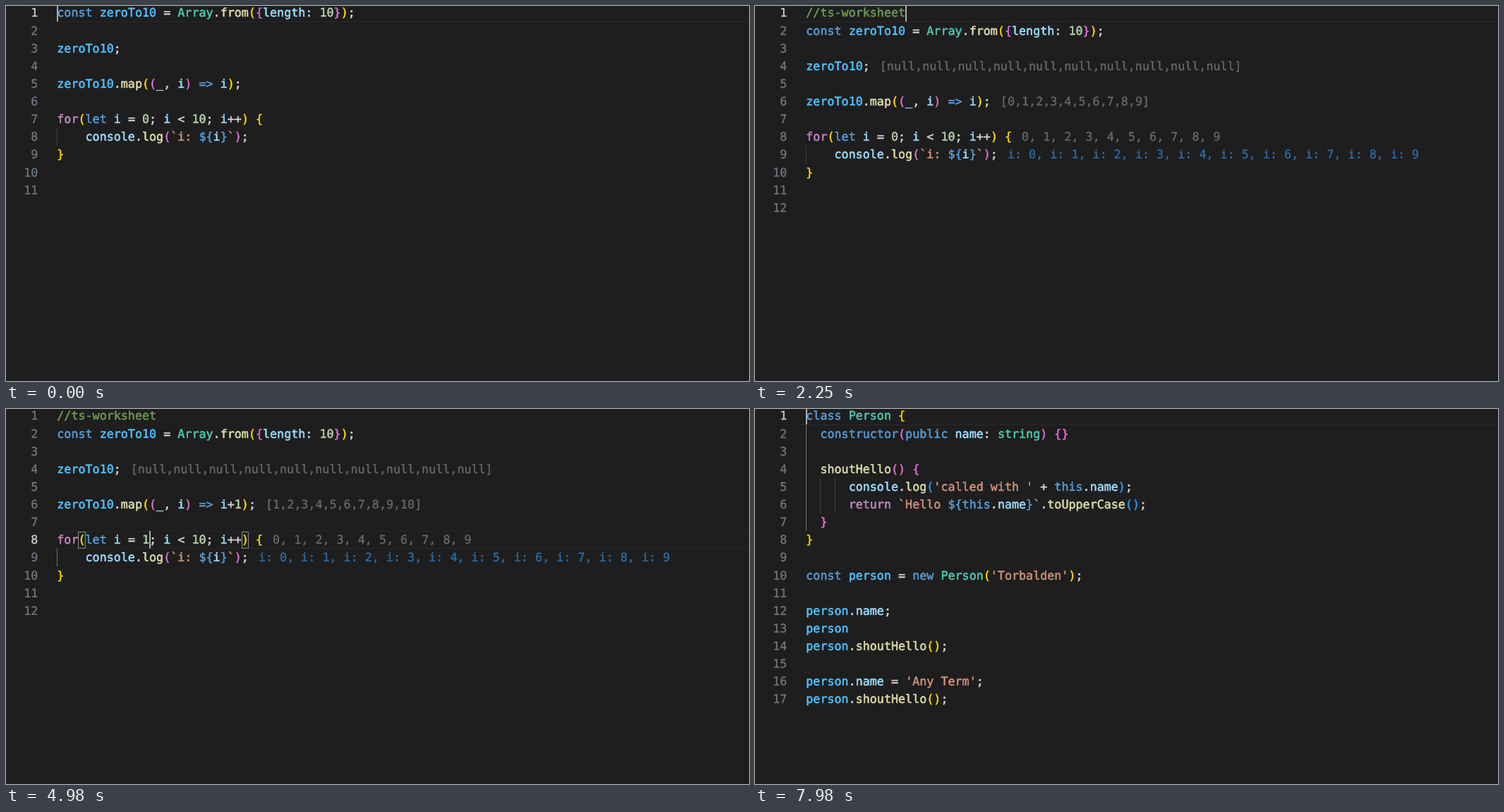
Animation, 1053 px wide and 532 px high, one loop 8 s. Source, as an HTML page:

```html
<!DOCTYPE html>
<html lang="en">
<head>
<meta charset="utf-8">
<title>Editor worksheet</title>
<style>
  html, body { margin: 0; width: 100%; height: 100%; overflow: hidden; background: #1e1e1e; }
  #stage {
    position: relative; width: 1053px; height: 532px; overflow: hidden;
    background: #1e1e1e; color: #d4d4d4;
    font: 16.72px/25.13px "DejaVu Sans Mono", "Noto Sans Mono", monospace;
    font-variant-ligatures: none; text-rendering: geometricPrecision;
    -webkit-text-stroke: 0.55px;
  }
  #stage div { position: absolute; box-sizing: border-box; }
  .row { left: 0; height: 25.13px; white-space: pre; }
  .num { left: 0; width: 45.3px; text-align: right; color: #6e7681; -webkit-text-stroke: 0.35px; }
  .num.on { color: #ccc; }
  .code { left: 72.3px; }
  .result { margin-left: 14px; -webkit-text-stroke: 0.35px; }
  .active { left: 64px; width: 988px; height: 25.13px; border: solid #282828; border-width: 1.5px 0; }
  .guide { width: 1px; background: #404040; }
  .guide.on { background: #707070; }
  .pair { height: 24px; border: 1px solid #888; background: rgba(0, 100, 0, .1); }
  #caret { width: 2px; height: 25px; background: #aeafad; }
  #edge { left: 1052px; top: 0; width: 1px; height: 532px; background: #161616; }
</style>
</head>
<body>
<div id="stage"><div id="page"></div><div id="caret"></div><div id="edge"></div></div>
<script>
const LOOP = 8000, BLINK = 480;
const LINE = 25.13, TOP = -2.6, LEFT = 72.3, CHAR = 10.066;
const GREY = '#686868', BLUE = '#2e6ca4', STRING = '#ce9178', KEYWORD = '#569cd6';
const BRACKETS = ['#ffd700', '#da70d6', '#179fff'];

const rules = [
  [/^\/\//, '#6a9955'],
  [/^'/, STRING],
  [/^(const|let|new|class|public|constructor|this|=>)$/, KEYWORD],
  [/^(for|return)$/, '#c586c0'],
  [/^(from|map|log|shoutHello|toUpperCase)$/, '#dcdcaa'],
  [/^(Array|Person|string)$/, '#4ec9b0'],
  [/^(zeroTo10|person)$/, '#4fc1ff'],
  [/^\d/, '#b5cea8'],
  [/^\w/, '#9cdcfe'],
];
const TOKEN = /\/\/.*|'[^']*'|\$\{|=>|\w+:(?= \d)|\w+|\s+|./g;

const count = (from, to) => Array.from({ length: to - from + 1 }, (_, i) => from + i);

function loopCode({ head, plus, start, out }) {
  const lines = [
    'const zeroTo10 = Array.from({length: 10});', '',
    'zeroTo10;', '',
    `zeroTo10.map((_, i) => i${plus});`, '',
    `for(let i = ${start}; i < 10; i++) {`,
    '    console.log(`i: ${i}`);',
    '}', '', '',
  ];
  if (head !== null) lines.unshift(head);
  const results = {};
  if (out) {
    const seen = count(out.start, 9);
    results[4] = [`[${Array(10).fill('null')}]`, GREY];
    results[6] = [`[${count(out.add, 9 + out.add)}]`, GREY];
    results[8] = [seen.join(', '), GREY];
    results[9] = [seen.map(i => 'i: ' + i).join(', '), BLUE];
  }
  const body = lines.length - 3;
  return { lines, results, guides: [[0, body, 1]] };
}

function classCode() {
  const lines = [
    'class Person {',
    '  constructor(public name: string) {}', '',
    '  shoutHello() {',
    "      console.log('called with ' + this.name);",
    '      return `Hello ${this.name}`.toUpperCase();',
    '  }',
    '}', '',
    "const person = new Person('Torbalden');", '',
    'person.name;',
    'person',
    'person.shoutHello();', '',
    "person.name = 'Any Term';",
    'person.shoutHello();',
  ];
  return { lines, results: {}, guides: [[0, 2, 6], [2, 5, 2], [4, 5, 2]] };
}

// Each step changes part of the state; `blink` restarts the caret's blinking.
const HEAD = '//ts-worksheet';
const steps = [
  { t: 0, doc: loopCode, head: null, plus: '', start: '0', out: null,
    row: 1, col: 0, pair: null, guide: 0, blink: 120 },
  { t: 1500, head: '', row: 2, blink: 1500 },
  { t: 1590, row: 1, blink: 1590 },
  ...count(1, HEAD.length).map(n => {
    const t = 1640 + n * 20;
    return { t, head: HEAD.slice(0, n), col: n, blink: t };
  }),
  { t: 2130, out: { add: 0, start: 0 }, blink: 2180 },
  { t: 3300, row: 6, col: 24, pair: [12, 24], blink: 3300 },
  { t: 3450, plus: '+', col: 25, pair: [12, 25], blink: 3450 },
  { t: 3570, plus: '+1', col: 26, pair: [12, 26], blink: 3570 },
  { t: 4050, out: { add: 1, start: 0 } },
  { t: 4380, row: 8, col: 13, pair: [3, 26], guide: 1, blink: 4380 },
  { t: 4530, start: '', col: 12, pair: [3, 25], blink: 4530 },
  { t: 4650, start: '1', col: 13, pair: [3, 26], blink: 4650 },
  { t: 5130, out: { add: 1, start: 1 } },
  { t: 7710, doc: classCode, row: 1, col: 0, pair: null, guide: 1, blink: 7710 },
];
const states = [];
for (const step of steps) states.push({ ...states[states.length - 1], ...step });

const page = document.getElementById('page');
const caret = document.getElementById('caret');
const lineY = row => TOP + (row - 1) * LINE;
const colX = col => LEFT + col * CHAR;

function add(parent, tag, name, style = {}, text = '') {
  const el = document.createElement(tag);
  el.className = name;
  el.textContent = text;
  Object.assign(el.style, style);
  parent.append(el);
  return el;
}

// Colours tokens and nests bracket colours across the whole document.
function painter() {
  let depth = 0, inTemplate = false, inHole = false;
  return token => {
    if (token === '`') { inTemplate = !inTemplate; return STRING; }
    if (inTemplate) {
      if (token === '${') { inHole = true; return KEYWORD; }
      if (inHole && token === '}') { inHole = false; return KEYWORD; }
      if (!inHole) return STRING;
    }
    if ('({'.includes(token)) return BRACKETS[depth++ % 3];
    if (')}'.includes(token)) return BRACKETS[--depth % 3];
    const rule = rules.find(([test]) => test.test(token));
    return rule ? rule[1] : '';
  };
}

function render(state) {
  const { lines, results, guides } = state.doc(state);
  const paint = painter();
  page.replaceChildren();
  add(page, 'div', 'active', { top: lineY(state.row) + 'px' });
  guides.forEach(([col, row, size], i) => {
    add(page, 'div', state.guide && !i ? 'guide on' : 'guide',
      { left: colX(col) + 'px', top: lineY(row) + 'px', height: size * LINE + 'px' });
  });
  for (const col of state.pair || []) {
    add(page, 'div', 'pair',
      { left: colX(col) + 'px', top: lineY(state.row) + .5 + 'px', width: CHAR + 'px' });
  }
  lines.forEach((line, i) => {
    const n = i + 1;
    const row = add(page, 'div', 'row', { top: lineY(n) + 'px' });
    add(row, 'div', n === state.row ? 'num on' : 'num', {}, n);
    const code = add(row, 'div', 'code');
    for (const token of line.match(TOKEN) || []) {
      add(code, 'span', '', { color: paint(token) }, token);
    }
    if (results[n]) add(code, 'span', 'result', { color: results[n][1] }, results[n][0]);
  });
  caret.style.left = colX(state.col) + 'px';
  caret.style.top = lineY(state.row) + 'px';
}

let shown = null;
const begin = performance.now();
function tick() {
  const t = (performance.now() - begin) % LOOP;
  const state = states.filter(s => s.t <= t).pop();
  if (state !== shown) render(shown = state);
  const phase = Math.floor(Math.max(0, t - state.blink) / BLINK);
  caret.style.visibility = phase % 2 ? 'hidden' : 'visible';
  requestAnimationFrame(tick);
}
tick();
</script>
</body>
</html>
```
